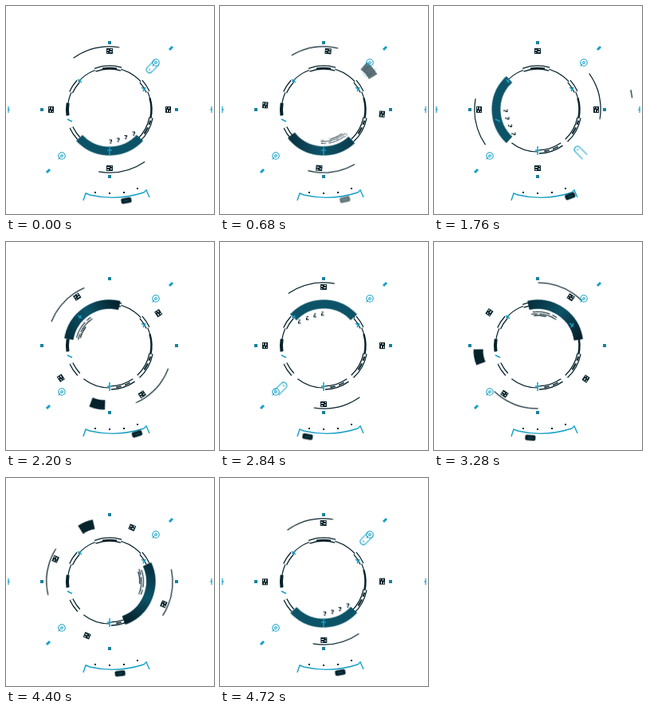
These frames come from a looping animation (261 by 261 pixels, 4760 ms). An HTML page without scripts:

```html
<!DOCTYPE html>
<html lang="en">
<head>
<meta charset="utf-8">
<title>Radial interface</title>
<style>
  html, body { margin: 0; width: 100%; height: 100%; overflow: hidden; background: #fff; }
  svg { display: block; width: 100vw; height: 100vh; }
  .line { fill: none; stroke: #06222b; }
  .cyan { fill: none; stroke: #16a0c6; }
  .ink { fill: #06222b; }
  .gap { fill: none; stroke: #fff; }

  .dial { animation: dial 4760ms ease-in infinite; }
  .still { animation: still 1190ms linear infinite; }
  .moving { animation: moving 1190ms linear infinite; }
  .blink { animation: blink 340ms step-end infinite; }
  .slider { animation: slider 4760ms linear infinite; }
  .sweep { animation: sweep 4760ms linear infinite; }

  /* Four quarter turns, each held and then accelerating */
  @keyframes dial {
    0%, 12.2% { transform: rotate(0deg); }
    24.2%, 37.2% { transform: rotate(90deg); }
    49.2%, 62.2% { transform: rotate(180deg); }
    74.2%, 87.2% { transform: rotate(270deg); }
    99.2%, 100% { transform: rotate(360deg); }
  }
  @keyframes still {
    0%, 52% { opacity: 1; }
    60%, 93% { opacity: 0; }
    96%, 100% { opacity: 1; }
  }
  @keyframes moving {
    0%, 52% { opacity: 0; }
    60%, 93% { opacity: 1; }
    96%, 100% { opacity: 0; }
  }
  @keyframes blink {
    0% { opacity: 1; }
    25% { opacity: 0; }
    75% { opacity: 1; }
  }
  @keyframes slider {
    0%, 12.6% { transform: rotate(-10.4deg); opacity: 1; }
    17% { transform: rotate(-18deg); opacity: 0; }
    33% { transform: rotate(-22deg); opacity: 0; }
    37% { transform: rotate(-20.6deg); opacity: 1; }
    47% { transform: rotate(-17deg); }
    59.7% { transform: rotate(10deg); }
    76.5% { transform: rotate(0deg); }
    92.4% { transform: rotate(-6.5deg); }
    99.2%, 100% { transform: rotate(-10.4deg); opacity: 1; }
  }
  @keyframes sweep {
    0%, 20% { transform: rotate(40deg); opacity: 0; stroke-dasharray: 0 360; }
    21.8% { transform: rotate(35deg); opacity: 1; stroke-dasharray: 1 360; }
    37% { transform: rotate(-12deg); opacity: 1; stroke-dasharray: 5 360; }
    42%, 100% { transform: rotate(-28deg); opacity: 0; stroke-dasharray: 5 360; }
  }
</style>
</head>
<body>
<svg viewBox="0 0 261 261" xmlns="http://www.w3.org/2000/svg">
  <defs>
    <linearGradient id="shade">
      <stop offset="0" stop-color="#06202a"/>
      <stop offset=".5" stop-color="#0d5368"/>
      <stop offset="1" stop-color="#06303d"/>
    </linearGradient>

    <g id="tag">
      <g class="still">
        <rect class="ink" x="-4" y="-77" width="8" height="7"/>
        <path class="gap" d="M-3 -74.5h2M1 -75.5h2M0 -72.5h3M-3 -71.5h1" stroke-width="1"/>
      </g>
      <g class="moving">
        <rect class="ink" x="-8.5" y="-76" width="17" height="8"/>
        <path class="gap" d="M-6 -74h7M0 -70h6" stroke-width=".6" opacity=".5"/>
      </g>
    </g>

    <path id="digit" class="line" d="M-1.5 -2h3v2h-2M-1 2h2.5" stroke-width="1.1"/>

    <g id="target" class="cyan">
      <circle r="4.2" stroke-width="1.1"/>
      <circle r="1.4" stroke-width="1"/>
      <path d="M-4.5 4.5l3 -3" stroke-width="1"/>
    </g>

    <!-- Curved bands as angle windows on one radius -->
    <g id="bands" fill="none">
      <circle r="53" pathLength="360" stroke-dasharray="18 360" transform="rotate(137)"/>
      <circle r="53" pathLength="360" stroke-dasharray="33 360" transform="rotate(55)"/>
      <circle r="53" pathLength="360" stroke-dasharray="36 360" transform="rotate(11)"/>
      <circle r="53" pathLength="360" stroke-dasharray="17 360" transform="rotate(318)"/>
      <circle r="53" pathLength="360" stroke-dasharray="18 360" transform="rotate(204)"/>
      <circle r="53" pathLength="360" stroke-dasharray="36 360" transform="rotate(250)"/>
    </g>
  </defs>

  <rect width="261" height="261" fill="#fff"/>

  <g transform="translate(130 130)">
    <!-- Fixed ring -->
    <circle class="line" r="52.5" pathLength="360" stroke-dasharray="232 360" transform="rotate(172)" stroke-width="1.2"/>
    <circle class="line" r="53" pathLength="360" stroke-dasharray="38 360" transform="rotate(90)" stroke-width="1.2"/>
    <use href="#bands" stroke="#06222b" stroke-width="5.4"/>
    <use href="#bands" stroke="#fff" stroke-width="2.8"/>
    <g class="line">
      <circle r="53" pathLength="360" stroke-dasharray="17 360" transform="rotate(172)" stroke-width="4"/>
      <circle r="52.5" pathLength="360" stroke-dasharray="28 360" transform="rotate(344)" stroke-width="2.4"/>
      <circle r="53" pathLength="360" stroke-dasharray="6 4 10 360" transform="rotate(15)" stroke-width="2"/>
      <circle r="53" pathLength="360" stroke-dasharray="8 5 7 360" transform="rotate(61)" stroke-width="1.6"/>
      <circle r="52" pathLength="360" stroke-dasharray="20 360" transform="rotate(260)" stroke-width="2.5"/>
    </g>

    <!-- Turning parts -->
    <g class="dial">
      <circle r="52" fill="none" stroke="#0d5368" stroke-width="11" pathLength="360" stroke-dasharray="94 360" transform="rotate(43)"/>
      <g class="moving">
        <path d="M-38 35A52 52 0 0 0 38 35" fill="none" stroke="url(#shade)" stroke-width="11"/>
      </g>

      <g class="line" stroke-width="1.2">
        <circle r="79" pathLength="360" stroke-dasharray="44 360" transform="rotate(235)"/>
        <circle r="79" pathLength="360" stroke-dasharray="44 360" transform="rotate(56)"/>
      </g>

      <use href="#tag"/>
      <use href="#tag" transform="rotate(90)"/>
      <use href="#tag" transform="rotate(180)"/>
      <use href="#tag" transform="rotate(270)"/>

      <g class="still">
        <use href="#digit" x="1" y="40"/>
        <use href="#digit" x="10.5" y="38"/>
        <use href="#digit" x="20" y="34.5"/>
        <use href="#digit" x="30" y="30"/>
      </g>
      <g class="moving line" stroke-width="1.1">
        <circle r="38" pathLength="360" stroke-dasharray="24 360" transform="rotate(48)"/>
        <circle r="40" pathLength="360" stroke-dasharray="12 3 32 360" transform="rotate(44)"/>
        <circle r="42.5" pathLength="360" stroke-dasharray="30 4 9 360" transform="rotate(47)"/>
      </g>

      <g transform="rotate(-45)">
        <g class="still cyan">
          <path d="M84 -4H71Q67 -4 67 0T71 4H84" stroke-width="1.2"/>
          <path d="M71 -1.5v3" stroke-width="1"/>
        </g>
        <path class="moving ink" d="M68 -8L80 -10Q82 0 80 10L68 8Q70 0 68 -8Z"/>
      </g>
    </g>

    <!-- Fixed highlights -->
    <g class="cyan" stroke-width="1.5">
      <path d="M0 46V57M-3 51H3"/>
      <path d="M-53 12l6 3M-40 -38l5 4M-36 -38l-2 4M40 -28l5 4M45 -28l-3 5"/>
    </g>
    <g fill="#16829f">
      <rect x="-2" y="-86" width="4" height="4"/>
      <rect x="-2" y="82" width="4" height="4"/>
      <rect x="-87" y="-2" width="4" height="4"/>
      <rect x="82" y="-2" width="4" height="4"/>
    </g>
    <use href="#target" x="58" y="-59"/>
    <use href="#target" x="-60" y="58"/>
    <g class="cyan" stroke-width="3">
      <path d="M75 -75l4 -4M-79 79l4 -4"/>
    </g>
    <g class="cyan blink" stroke-width="1.2">
      <path d="M-127 -4V4M-128 0H-125M128 -4V4M126 0H129"/>
    </g>

    <!-- Lower scale -->
    <path class="cyan" d="M-33 114L-30 105L-25 107Q8 115 43 104L46 101L50 110" stroke-width="1.4"/>
    <path class="line" d="M-18 103v2M0 104v2M18 103v2M35 98v2" stroke-width="2"/>
    <g class="slider">
      <rect class="ink" x="-6.5" y="112.5" width="13" height="7" rx="2"/>
      <path class="cyan" d="M-3 116H3" stroke-width=".8" opacity=".5"/>
    </g>
    <circle class="line sweep" r="119.5" pathLength="360" stroke-width="1.2"/>
  </g>
</svg>
</body>
</html>
```
